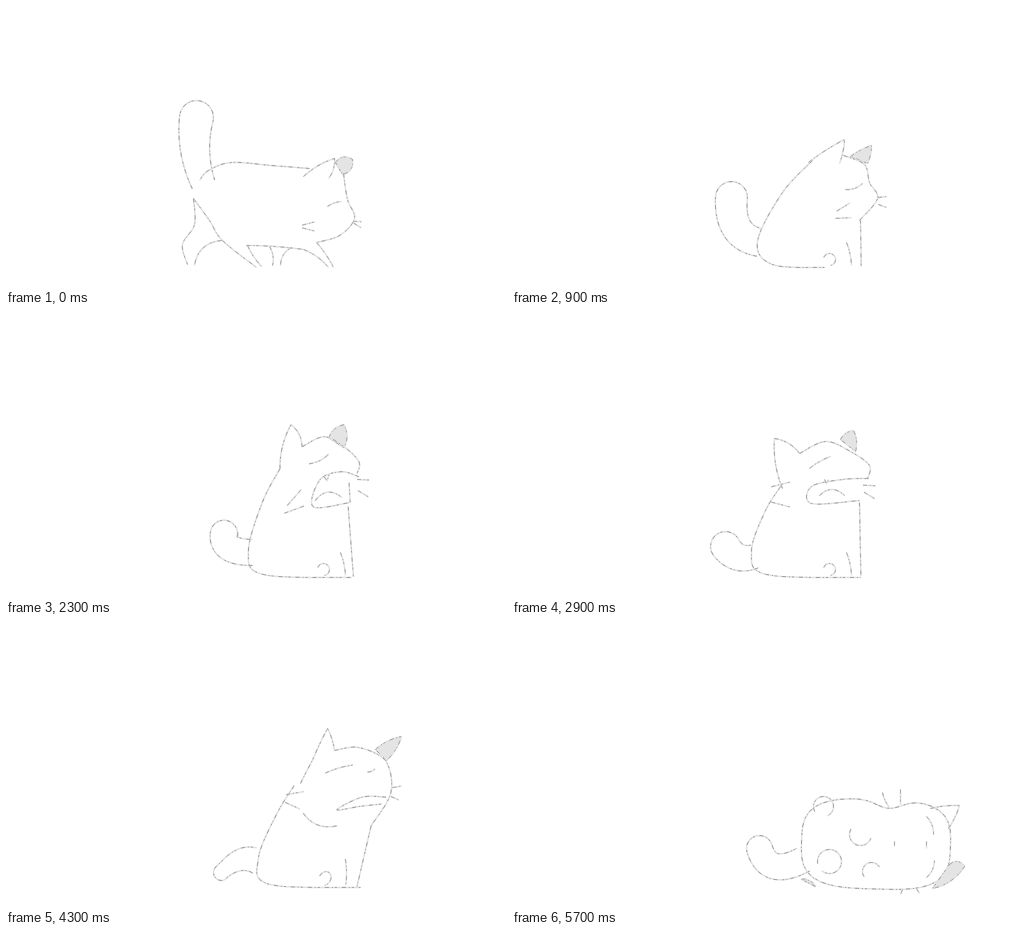
Animation, 500 px wide and 282 px high, one loop 5800 ms. Source, as an HTML page with a canvas:

```html
<!DOCTYPE html>
<html lang="en">
<head>
<meta charset="utf-8">
<title>Sleepy cat</title>
<style>
html, body { margin: 0; width: 100%; height: 100%; overflow: hidden; background: #fff; }
canvas { display: block; width: 100vw; height: 100vh; }
</style>
</head>
<body>
<canvas id="stage" width="500" height="282"></canvas>
<script>
const LOOP = 5800, STEP = 100, SAMPLES = 60;
const FILLED = ['far', 'shade'];
const { PI, sin, cos, abs, hypot, exp } = Math;
const ctx = document.getElementById('stage').getContext('2d');

const clamp = v => Math.max(0, Math.min(1, v));
const mix = (a, b, u) => a + (b - a) * u;

// Every stroke is sampled equally, so any two can blend.
const trace = fn => Array.from({ length: SAMPLES + 1 }, (_, k) => fn(k / SAMPLES));

// A line from end to end that bulges sideways by h.
function bow(x1, y1, x2, y2, h = 0) {
  const dx = x2 - x1, dy = y2 - y1, len = hypot(dx, dy);
  return trace(t => {
    const b = 4 * t * (1 - t) * h / len;
    return [x1 + dx * t + dy * b, y1 + dy * t - dx * b];
  });
}

// A smooth curve through a few points.
function curve(...n) {
  const last = n.length / 2 - 1;
  const at = (i, d) => n[2 * Math.max(0, Math.min(last, i)) + d];
  return trace(s => {
    const i = Math.min(Math.floor(s * last), last - 1), t = s * last - i;
    return [0, 1].map(d => {
      const a = at(i, d), b = at(i + 1, d);
      const m = (b - at(i - 1, d)) / 2, k = (at(i + 2, d) - a) / 2;
      return a + t * (m + t * (3 * (b - a) - 2 * m - k + t * (2 * (a - b) + m + k)));
    });
  });
}

// An ear: base, tip, base, with rounded sides.
function peak(ax, ay, tx, ty, bx, by, h = 2) {
  const up = bow(ax, ay, tx, ty, h), down = bow(tx, ty, bx, by, h);
  return trace(s => (s < .5 ? up : down)[Math.round((s < .5 ? s : s - .5) * 2 * SAMPLES)]);
}

const arc = (x, y, r, from, to) => trace(s => {
  const a = mix(from, to, s) * PI / 180;
  return [x + r * cos(a), y + r * sin(a)];
});

// A tail: bent spine, thickness at root and tip, round end.
function tail(x0, y0, cx, cy, x1, y1, r0, r1) {
  return trace(s => {
    const t = clamp(Math.min(s, 1 - s) / .4), q = 1 - t, r = mix(r0, r1, t);
    const turn = clamp((s - .4) / .2) * PI;
    const dx = q * (cx - x0) + t * (x1 - cx), dy = q * (cy - y0) + t * (y1 - cy), len = hypot(dx, dy);
    const c = cos(turn) * r / len, n = sin(turn) * r / len;
    return [
      q * q * x0 + 2 * q * t * cx + t * t * x1 + dy * c + dx * n,
      q * q * y0 + 2 * q * t * cy + t * t * y1 - dx * c + dy * n
    ];
  });
}

// A lying body: tilted superellipse with a dent between back and head.
function loaf(x, y, rx, ry, tilt, power, dent) {
  return trace(s => {
    const a = -PI / 2 - 2 * PI * s;
    const r = (abs(cos(a) / rx) ** power + abs(sin(a) / ry) ** power) ** (-1 / power);
    const u = r * cos(a), v = r * sin(a);
    const w = v + (v < 0 ? dent * exp(-(((u - 12) / 18) ** 2)) : 0);
    return [x + u * cos(tilt) - w * sin(tilt), y + u * sin(tilt) + w * cos(tilt)];
  });
}

// Two hairs, one above the other, spreading apart.
function fan(name, x, y, len, angle, gap) {
  const hair = side => {
    const a = angle + side * .25, dx = cos(a) * len / 2, dy = sin(a) * len / 2, cy = y + side * gap / 2;
    return bow(x - dx, cy - dy, x + dx, cy + dy);
  };
  return { [name + 'A']: hair(-1), [name + 'B']: hair(1) };
}

function walk(dx, phase) {
  const swing = 8 * sin(phase);
  const cat = {
    tail: tail(197, 178, 184, 145, 190, 111, 12, 17),
    body: curve(303, 162, 265, 159, 225, 156, 202, 164, 193, 174),
    rump: curve(187, 192, 203, 214, 216, 234, 250 - swing, 261),
    legA: curve(187, 192, 188, 218, 176, 238, 181 + swing, 258),
    legB: bow(215, 234, 188 + swing, 259, -7),
    legC: bow(241, 239, 255 - swing, 260, -1),
    legD: bow(263, 240, 266 + swing, 259, 2),
    legE: bow(285, 241, 274 + swing, 259, -3),
    legF: bow(297, 243, 322 - swing, 261, 2),
    belly: bow(240, 239, 297, 243, 1),
    chest: bow(310, 236, 327 - swing, 261, 1),
    ear: peak(297, 170, 328, 152, 322, 172),
    far: peak(329, 156, 346, 153, 336, 168, 4),
    head: curve(337, 167, 341, 193, 348, 212, 333, 229, 310, 236),
    eye: bow(321, 200, 335, 195, 1),
    ...fan('cheek', 302, 220, 13, 0, 6),
    ...fan('whisk', 351, 217, 9, .3, 4)
  };
  return shift(cat, dx, -dx / 4);
}

// What every sitting pose shares; the rest of the face is passed in.
function sit(neckX, neckY, rump, end, chestX, chestY, face) {
  return {
    body: curve(neckX, neckY, mix(neckX, rump, .55), mix(neckY, 235, .4), rump, 235, rump + 15, 258, end, 261),
    chest: bow(chestX, chestY, mix(chestX, 349, .7), 260),
    inner: bow(334, 236, 339, 259, 1),
    foot: arc(317, 253, 6, 200, 440),
    ...face
  };
}

const shift = (pose, dx, dy, weight = () => 1) => Object.fromEntries(
  Object.entries(pose).map(([name, pts]) => [name, pts.map(([x, y]) => {
    const w = weight(name, x, y);
    return [x + dx * w, y + dy * w];
  })]));
const lean = (pose, dx, dy) =>
  shift(pose, dx, dy, (name, x, y) => name === 'tail' ? 0 : clamp((260 - y) / 110));
const wag = (pose, dx, dy, root = 248) =>
  shift(pose, dx, dy, (name, x) => name === 'tail' ? clamp((root - x) / 45) : 0);

const calm = sit(300, 154, 245, 312, 348, 213, {
  tail: tail(247, 236, 216, 230, 219, 191, 14, 16),
  ear: peak(296, 156, 332, 133, 327, 157, 1),
  far: peak(338, 150, 359, 139, 355, 157, 1),
  head: curve(331, 149, 352, 158, 357, 176, 365, 192, 347, 214),
  eye: bow(333, 183, 350, 177, -2),
  ...fan('cheek', 331, 206, 16, -.3, 11),
  ...fan('whisk', 370, 195, 9, .1, 9)
});

const yawn = sit(274, 152, 242, 345, 342, 190, {
  tail: tail(246, 236, 214, 236, 217, 218, 13, 14),
  ear: peak(274, 152, 285, 108, 296, 130, 3),
  far: peak(323, 121, 338, 108, 338, 131, 3),
  head: curve(296, 130, 318, 120, 338, 130, 353, 145, 351, 157),
  lip: curve(353, 160, 335, 155, 314, 163, 307, 190, 343, 186),
  tongue: bow(309, 184, 336, 181, 7),
  fang: peak(318, 160, 321, 164, 323, 158, 0),
  chin: bow(343, 166, 344, 186),
  eye: bow(303, 147, 323, 137, -2),
  ...fan('cheek', 288, 187, 21, -.6, 12),
  ...fan('whisk', 357, 170, 12, .3, 14)
});

const chew = sit(268, 170, 239, 348, 347, 186, {
  tail: tail(242, 240, 224, 246, 213, 230, 12, 15),
  ear: peak(270, 172, 262, 122, 287, 137, 3),
  far: peak(328, 123, 341, 114, 343, 135),
  head: curve(287, 137, 313, 125, 338, 135, 357, 149, 355, 162),
  lip: curve(356, 162, 330, 163, 299, 170, 299, 187, 347, 184),
  tongue: bow(307, 179, 332, 179, 6),
  fang: peak(312, 163, 314, 167, 316, 163, 0),
  eye: bow(297, 152, 318, 140, 1),
  ...fan('cheek', 268, 178, 19, 0, 20),
  ...fan('whisk', 357, 174, 13, .3, 10)
});

const squint = sit(270, 172, 247, 354, 354, 207, {
  tail: tail(248, 234, 226, 230, 203, 250, 13, 8),
  ear: peak(276, 170, 299, 118, 306, 140, 1),
  far: peak(347, 139, 373, 126, 358, 150),
  head: curve(306, 140, 330, 137, 357, 150, 368, 178, 354, 207),
  lip: curve(364, 182, 340, 182, 317, 193, 340, 190, 361, 188),
  chin: bow(284, 196, 320, 207, -5),
  fang: bow(341, 160, 348, 157, -1),
  eye: bow(299, 161, 325, 154, 1),
  ...fan('cheek', 272, 184, 17, .1, 11),
  ...fan('whisk', 373, 178, 9, .1, 10)
});

const flop = {
  tail: tail(290, 222, 280, 192, 252, 191, 13, 13),
  body: loaf(354, 210, 78, 46, -.2, 2.6, 5),
  ear: peak(392, 156, 406, 136, 411, 163, 3),
  far: peak(430, 209, 455, 211, 420, 234, 5),
  shade: peak(288, 258, 298, 254, 312, 262, 0),
  pawA: arc(308, 217, 10, 170, -50),
  pawB: arc(343, 204, 11, 270, 45),
  foot: arc(321, 248, 9, 160, 385),
  toe: arc(357, 243, 8, 90, 310),
  lidA: bow(400, 165, 411, 184, 1),
  lidB: bow(418, 228, 420, 207, -2),
  slitA: bow(384, 204, 384, 208),
  slitB: bow(409, 193, 411, 200),
  whiskA: bow(362, 152, 371, 163, -1),
  whiskB: bow(383, 138, 382, 158),
  whiskC: bow(407, 238, 414, 249),
  whiskD: bow(420, 240, 424, 238)
};

const sleep = {
  tail: tail(291, 233, 256, 252, 247, 222, 13, 13),
  body: loaf(363.5, 217.5, 74.5, 45, .03, 3.3, 9),
  ear: peak(418, 182, 447, 179, 436, 202, 1),
  far: peak(437, 238, 452, 240, 420, 262, 4),
  shade: peak(289, 253, 296, 254, 303, 260, 1),
  heel: arc(311, 180, 10, 150, 430),
  pawA: arc(317, 235, 12, 170, 490),
  pawB: arc(348, 208, 11, 210, 20),
  toe: arc(359, 245, 9, 145, 330),
  lidA: bow(414, 190, 421, 208, 2),
  lidB: bow(414, 251, 422, 234, -2),
  slitA: bow(382, 215, 382, 220),
  slitB: bow(414, 215, 414, 222),
  whiskA: bow(370, 166, 377, 181, -1),
  whiskB: bow(388, 163, 388, 178),
  whiskC: bow(390, 263, 388, 268),
  whiskD: bow(404, 262, 407, 267)
};

const keys = [
  [0, walk(0, 0)], [150, walk(7, 1)], [300, walk(14, 2.2)], [600, lean(calm, 9, -7)], [900, calm],
  [1200, wag(lean(calm, -7, 2), -6, 4)], [1700, yawn], [2100, lean(wag(yawn, 3, -2), -2, 1)],
  [2400, yawn], [2900, chew], [3200, wag(lean(chew, 3, 2), -4, 2)], [3800, squint],
  [4200, lean(squint, 19, -10)], [4300, wag(lean(squint, 22, -16), 12, -4)],
  [4800, flop], [5400, wag(sleep, -7, 3, 290)], [5700, sleep]
];

function poseAt(time) {
  const next = keys.findIndex(k => k[0] > time);
  if (next < 0) return sleep;
  const [t0, a] = keys[next - 1], [t1, b] = keys[next];
  const s = (time - t0) / (t1 - t0), u = s * s * (3 - 2 * s);
  const out = {};
  for (const name in { ...a, ...b }) {
    if (a[name] && b[name]) {
      out[name] = a[name].map((p, k) => p.map((v, d) => mix(v, b[name][k][d], u)));
    } else {
      const only = (u < .5 ? a : b)[name];
      if (only) out[name] = only;
    }
  }
  return out;
}

function ink(path, color, width, dash) {
  ctx.strokeStyle = color;
  ctx.lineWidth = width;
  ctx.setLineDash(dash);
  ctx.stroke(path);
}

function draw(time) {
  ctx.fillStyle = '#fff';
  ctx.fillRect(0, 0, 500, 282);
  ctx.lineJoin = 'round';
  for (const [name, pts] of Object.entries(poseAt(time))) {
    const path = new Path2D();
    pts.forEach(([x, y]) => path.lineTo(x + .5, y + .5));
    if (FILLED.includes(name)) {
      path.closePath();
      ctx.fillStyle = '#e4e4e4';
      ctx.fill(path);
    }
    ink(path, '#e0e0e0', 1.5, []);
    ink(path, '#8c8c8c', .8, [4, 3, 1, 2, 2, 5]);
  }
}

let shown = -1;
function tick() {
  const time = Math.floor(performance.now() % LOOP / STEP) * STEP;
  if (time !== shown) draw(shown = time);
  requestAnimationFrame(tick);
}
tick();
</script>
</body>
</html>
```
